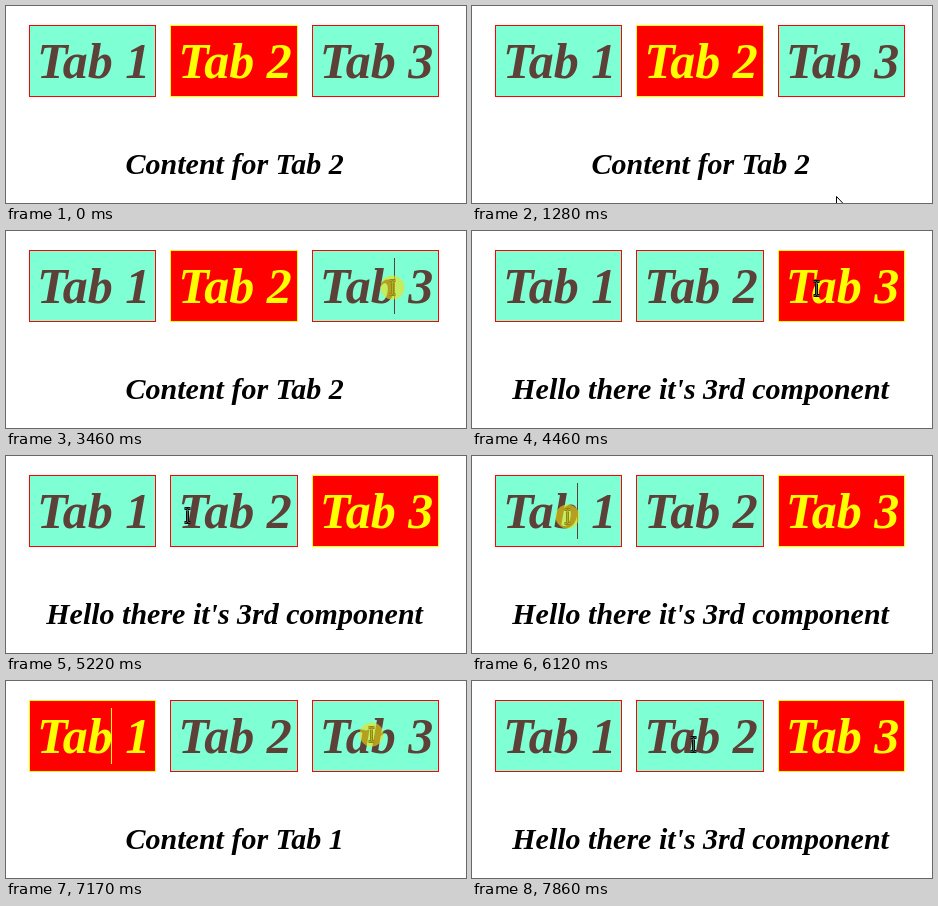
An HTML page for the animation above (8 s loop, 460 by 197 pixels).

```html
<!DOCTYPE html>
<html lang="en">
<head>
<meta charset="utf-8">
<title>Tabs</title>
<style>
  html, body { margin: 0; width: 100%; height: 100%; overflow: hidden; background: #fff; }
  svg { display: block; }
  text { font: italic bold 50px "Liberation Serif", "Times New Roman", serif; font-kerning: normal; }
  .tab rect { fill: #7fffd4; stroke: #f00; }
  .tab text { fill: #5d4037; }
  .tab.on rect { fill: #f00; stroke: #ff0; }
  .tab.on text { fill: #ff0; }
  #content { font-size: 30px; text-anchor: middle; }
  #beam path { fill: none; stroke: #0c0c0c; stroke-width: 3; }
  #beam path + path { stroke: #4a6468; stroke-width: 1; }
</style>
</head>
<body>
<svg width="460" height="197" viewBox="0 0 460 197">
  <g id="tabs"></g>
  <text id="content" x="228.6" y="168"></text>
  <rect id="caret" y="27" width="1" height="56"/>
  <g id="beam"></g>
  <path id="arrow" d="M.5 .5V16.5L4.2 13 6.7 18.5 9 17.5 6.6 12.2H11.6Z" fill="#fff" stroke="#000"/>
  <circle id="glow" r="12" fill="#f0e010" opacity=".6"/>
</svg>
<script>
const LOOP = 8000, STEP = 70, BLINK = 530;
const WIDTH = 127.45, GAP = 14, LETTER = 25;
const $ = id => document.getElementById(id);

function add(parent, name, attrs) {
  const el = document.createElementNS("http://www.w3.org/2000/svg", name);
  for (const k in attrs) el.setAttribute(k, attrs[k]);
  return parent.appendChild(el);
}

const leftOf = tab => 22.9 + tab * (WIDTH + GAP);
const textX = tab => leftOf(tab) + 8;

const tabs = [0, 1, 2].map(i => {
  const g = add($("tabs"), "g", { class: "tab" });
  const l = Math.round(leftOf(i)), r = Math.round(leftOf(i) + WIDTH);
  add(g, "rect", { x: l + .5, y: 19.5, width: r - l - 1, height: 71 });
  add(g, "text", { x: textX(i), y: 72 }).textContent = "Tab " + (i + 1);
  return g;
});

for (let i = 0; i < 2; i++) {
  add($("beam"), "path", { d: "M1.5 1.5H3.5L4.5 2.5 5.5 1.5H7.5M4.5 2V15M1.5 15.5H3.5L4.5 14.5 5.5 15.5H7.5" });
}

const contents = ["Content for Tab 1", "Content for Tab 2", "Hello there it's 3rd component"];

// caret lands after the given number of letters
const clicks = [
  { press: 3390, release: 3530, tab: 2, letters: 3 },
  { press: 6040, release: 6250, tab: 0, letters: 3 },
  { press: 7110, release: 7300, tab: 2, letters: 2 }
];

// pointer glides: start, end, x, y
const glides = [
  [1280, 1910, 385, 40],
  [2970, 3040, 382, 48],
  [4250, 5640, 91, 52],
  [6640, 6840, 361, 45],
  [7570, 7860, 217, 55]
];

// halfway between linear and smoothstep
const ease = p => (p + p * p * (3 - 2 * p)) / 2;

function pointerAt(t) {
  let x = 363, y = 200;
  for (const [from, to, tx, ty] of glides) {
    if (t < from) break;
    const count = Math.round((to - from) / STEP) + 1;
    const step = t >= to ? count : Math.floor((t - from) / STEP) + 1;
    const p = ease(Math.min(1, step / count));
    x += (tx - x) * p;
    y += (ty - y) * p;
  }
  return [Math.round(x), Math.round(y)];
}

const show = (el, on) => el.setAttribute("visibility", on ? "visible" : "hidden");
const place = (el, x, y) => el.setAttribute("transform", `translate(${x} ${y})`);
const last = test => clicks.filter(test).pop();

function draw(t) {
  const done = last(c => t >= c.release);
  const active = done ? done.tab : 1;
  tabs.forEach((g, i) => g.classList.toggle("on", i === active));
  $("content").textContent = contents[active];

  const focus = last(c => t >= c.press + STEP);
  show($("caret"), focus && Math.floor((t - focus.press - STEP) / BLINK) % 2 === 0);
  if (focus) {
    $("caret").setAttribute("x", Math.floor(textX(focus.tab) + focus.letters * LETTER));
    $("caret").setAttribute("fill", focus.tab === active ? "#ff0" : "#5d4037");
  }

  const [x, y] = pointerAt(t);
  const overTab = y < 83;
  show($("beam"), overTab);
  show($("arrow"), !overTab);
  place($("beam"), x, y);
  place($("arrow"), x, y);

  show($("glow"), clicks.some(c => t >= c.press && t < c.release));
  place($("glow"), x + 4.5, y + 8.5);
}

const begin = performance.now();
function tick() {
  draw((performance.now() - begin) % LOOP);
  requestAnimationFrame(tick);
}
tick();
</script>
</body>
</html>
```
